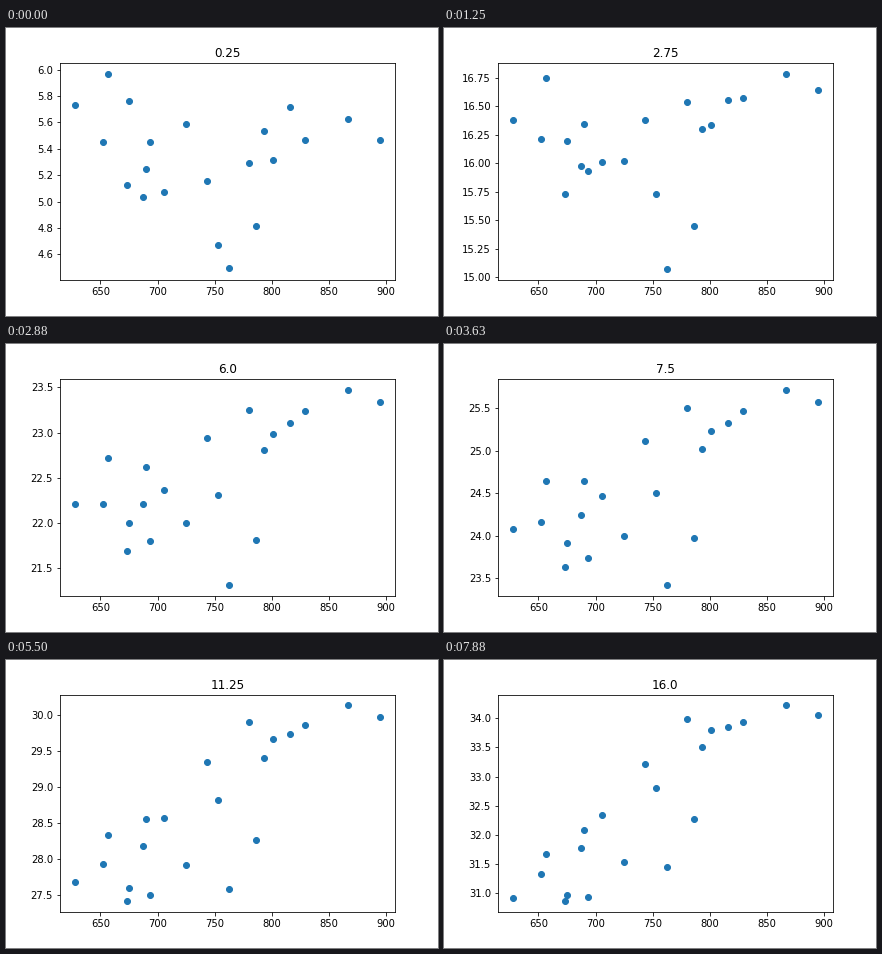
A matplotlib script for the animation above (8000 ms loop, 432 by 288 pixels).

```python
import matplotlib.pyplot as plt
import numpy as np
from matplotlib.animation import FuncAnimation

FRAMES, LOOP_MS, STEP = 64, 8000, 0.25
TOP, BOTTOM = 0.88, 0.125

# Each dot: x, then its offset from the mean height early, midway and late
KEY_TIMES = np.array([0.25, 6, 16])
dots = np.array([
    (627.9, 0.40, -0.29, -1.53), (652.6, 0.12, -0.28, -1.12),
    (656.9, 0.63, 0.22, -0.78), (673.6, -0.21, -0.81, -1.59),
    (674.6, 0.43, -0.49, -1.48), (686.9, -0.30, -0.29, -0.68),
    (690.2, -0.09, 0.12, -0.37), (693.7, 0.12, -0.69, -1.52),
    (706.0, -0.26, -0.13, -0.11), (725.3, 0.25, -0.49, -0.92),
    (743.6, -0.18, 0.45, 0.76), (753.3, -0.66, -0.19, 0.36),
    (762.9, -0.84, -1.18, -1.00), (780.4, -0.04, 0.76, 1.53),
    (786.6, -0.52, -0.68, -0.18), (793.6, 0.20, 0.31, 1.05),
    (801.4, -0.02, 0.49, 1.34), (816.3, 0.38, 0.61, 1.40),
    (829.4, 0.13, 0.74, 1.49), (867.1, 0.29, 0.98, 1.77),
    (894.5, 0.13, 0.84, 1.60),
])
x, offsets = dots[:, 0], dots[:, 1:]

# Mean growth: sqrt(t) times a gently falling factor
root = np.sqrt([0.25, 2.75, 6, 9, 11.25, 16])
factor = np.polyfit(root, [10.671, 9.754, 9.198, 8.793, 8.544, 8.116], 3)


def pace(t):
    return np.arcsinh(t / 3)


drift = np.polyfit(pace(KEY_TIMES), offsets.T, 2)


def heights(t):
    s, p = np.sqrt(t), pace(t)
    return s * np.polyval(factor, s) + np.array([p * p, p, 1]) @ drift


def limits(v, pad=0.0):
    lo, hi = v.min() - pad, v.max() + pad
    margin = 0.05 * (hi - lo)
    return lo - margin, hi + margin


fig, ax = plt.subplots(figsize=(6, 4), dpi=72)
fig.subplots_adjust(left=0.125, right=0.9, bottom=BOTTOM, top=TOP)
cloud = ax.scatter(x, heights(STEP), s=36, color="#1f77b4")
title = ax.set_title("")
ax.set_xlim(limits(x))
PAD = 3 / ((TOP - BOTTOM) * 288)  # marker radius over axes height


def update(i):
    t = STEP * (i + 1)
    y = heights(t)
    cloud.set_offsets(np.column_stack([x, y]))
    ax.set_ylim(limits(y, PAD))
    title.set_text(str(t))
    return cloud, title


anim = FuncAnimation(fig, update, frames=FRAMES, interval=LOOP_MS / FRAMES,
                     repeat=True, repeat_delay=0, blit=False)
plt.show()
```
